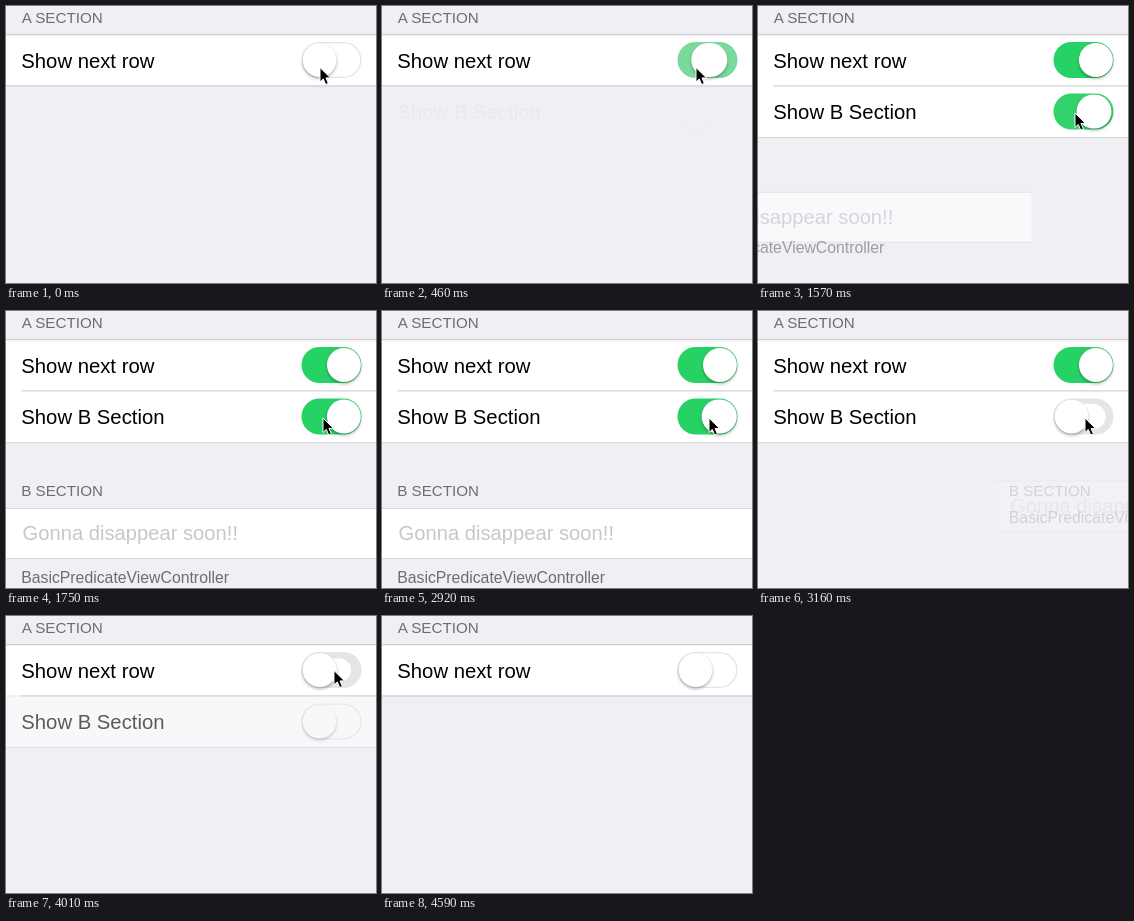
Write an HTML page that moves like this. It is 370 px wide and 277 px high and loops after 4890 ms.

```html
<!DOCTYPE html>
<html lang="en">
<head>
<meta charset="utf-8">
<title>Conditional form rows</title>
<style>
  html, body { margin: 0; width: 100%; height: 100%; overflow: hidden; background: #efeff4; }
  svg { display: block; width: 370px; height: 277px; font: 20.3px "Liberation Sans", Arial, sans-serif; }
  .caption { font-size: 15.2px; fill: #6d6d72; }
  .line { fill: #cfced3; }
  .thin { fill: #d8d7dc; }
  .knob { fill: #fff; stroke: #0001; stroke-width: .6; filter: drop-shadow(0 2.5px 1.5px #0004); }
</style>
</head>
<body>
<svg viewBox="0 0 370 277">
  <defs>
    <g id="switch">
      <rect class="track" x="-30" y="-18" width="60" height="36" rx="18"/>
      <rect class="well" x="-28.7" y="-16.7" width="57.4" height="33.4" rx="16.7" fill="#fff"/>
      <rect class="knob" y="-17" height="34" rx="17"/>
    </g>
  </defs>

  <text class="caption" x="15.7" y="17">A SECTION</text>
  <rect y="29" width="370" height="51" fill="#fff"/>
  <rect class="line" y="28" width="370" height="1.3"/>
  <rect class="line" y="79.3" width="370" height="1.3"/>
  <text x="15.3" y="62">Show next row</text>

  <g id="row">
    <rect y="80.6" width="370" height="51" fill="#fff"/>
    <rect y="79" width="15" height="2" fill="#fff"/>
    <rect class="thin" y="131" width="370" height="1"/>
    <text x="15.3" y="113">Show B Section</text>
  </g>

  <g id="section">
    <g id="cell">
      <rect y="197.5" width="370" height="50" fill="#fff"/>
      <rect class="thin" y="197" width="370" height="1"/>
      <rect class="thin" y="247" width="370" height="1"/>
      <text x="16.5" y="229.3" fill="#c7c7cc" style="font-size:20.2px">Gonna disappear soon!!</text>
    </g>
    <text class="caption" x="15.2" y="185.3">B SECTION</text>
    <text class="caption" id="footer" x="15.2" y="271.6" style="font-size:15.8px">BasicPredicateViewController</text>
  </g>

  <path id="cursor" d="M0 0V14.5L3.3 11.4 5.7 17 8.4 15.9 6 10.4H10.5Z" stroke="#fff" stroke-width="1"/>
</svg>
<script>
const LOOP = 4890;
const $ = id => document.getElementById(id);
const mix = (a, b, p) => a + (b - a) * p;
const ramp = (t, from, to) => Math.min(1, Math.max(0, (t - from) / (to - from)));
const smooth = p => p * p * (3 - 2 * p);
const easeOut = p => 1 - (1 - p) ** 3;
const move = (el, x, y) => el.setAttribute('transform', `translate(${x} ${y})`);

// time, x, y
const cursorPath = [
  [0, 314, 61.5], [640, 314, 61.5], [810, 315, 80], [870, 315, 82], [1050, 316, 100.5],
  [1330, 317, 107], [2040, 317, 107], [2200, 327, 107], [3210, 327, 107],
  [3440, 328, 64.5], [3500, 328, 62], [3550, 328, 54.5], [4190, 328, 54.5]
];

function makeSwitch(parent, y, onAt, offAt) {
  const g = $('switch').cloneNode(true);
  g.removeAttribute('id');
  move(g, 325.5, y);
  parent.append(g);
  const [track, well, knob] = g.children;

  return t => {
    const slide = at => smooth(ramp(t, at + 90, at + 220));
    const press = at => ramp(t, at - 30, at + 40) * (1 - ramp(t, at + 130, at + 240));
    const on = slide(onAt) - slide(offAt);
    const width = 34 + 3 * Math.max(press(onAt), press(offAt));
    const open = 1 - smooth(ramp(t, onAt - 20, onAt + 90)) + easeOut(ramp(t, offAt + 125, offAt + 425));
    const rgb = [[229, 39], [229, 210], [229, 101]].map(([off, green]) => mix(off, green, on));
    track.setAttribute('fill', `rgb(${rgb})`);
    well.setAttribute('transform', `scale(${open})`);
    knob.setAttribute('width', width);
    knob.setAttribute('x', mix(-29, 29.4 - width, on));
  };
}

const row = $('row'), section = $('section'), cursor = $('cursor');
const switches = [
  makeSwitch(cursor.parentNode, 54, 300, 3790),
  makeSwitch(row, 105.5, 1370, 2920)
];
cursor.parentNode.append(cursor);

function drawSection(t) {
  const enter = easeOut(ramp(t, 1470, 1750));
  const leave = easeOut(ramp(t, 3063, 3405));
  const hidden = t < 2500 ? 1 - enter : leave;
  move(section, 370 * (leave - 1 + enter), 0);
  section.setAttribute('opacity', (1 - hidden) ** 1.5);
  move($('cell'), 0, -43 * hidden);
  move($('footer'), 0, -94 * hidden);
}

function drawCursor(t) {
  const leaving = t >= 4480 && t < 4590;
  cursor.style.display = t < 4190 || leaving ? '' : 'none';
  if (leaving) {
    const p = ramp(t, 4480, 4590);
    return move(cursor, mix(360, 367, p), mix(256, 272, p));
  }
  const i = cursorPath.findIndex(k => k[0] > t);
  if (i < 1) return;
  const [t0, x0, y0] = cursorPath[i - 1], [t1, x1, y1] = cursorPath[i];
  const p = ramp(t, t0, t1);
  move(cursor, mix(x0, x1, p), mix(y0, y1, p));
}

function draw() {
  const t = performance.now() % LOOP;
  switches.forEach(update => update(t));
  row.setAttribute('opacity', smooth(ramp(t, 430, 780)) - smooth(ramp(t, 3880, 4190)));
  drawSection(t);
  drawCursor(t);
  requestAnimationFrame(draw);
}
draw();
</script>
</body>
</html>
```
